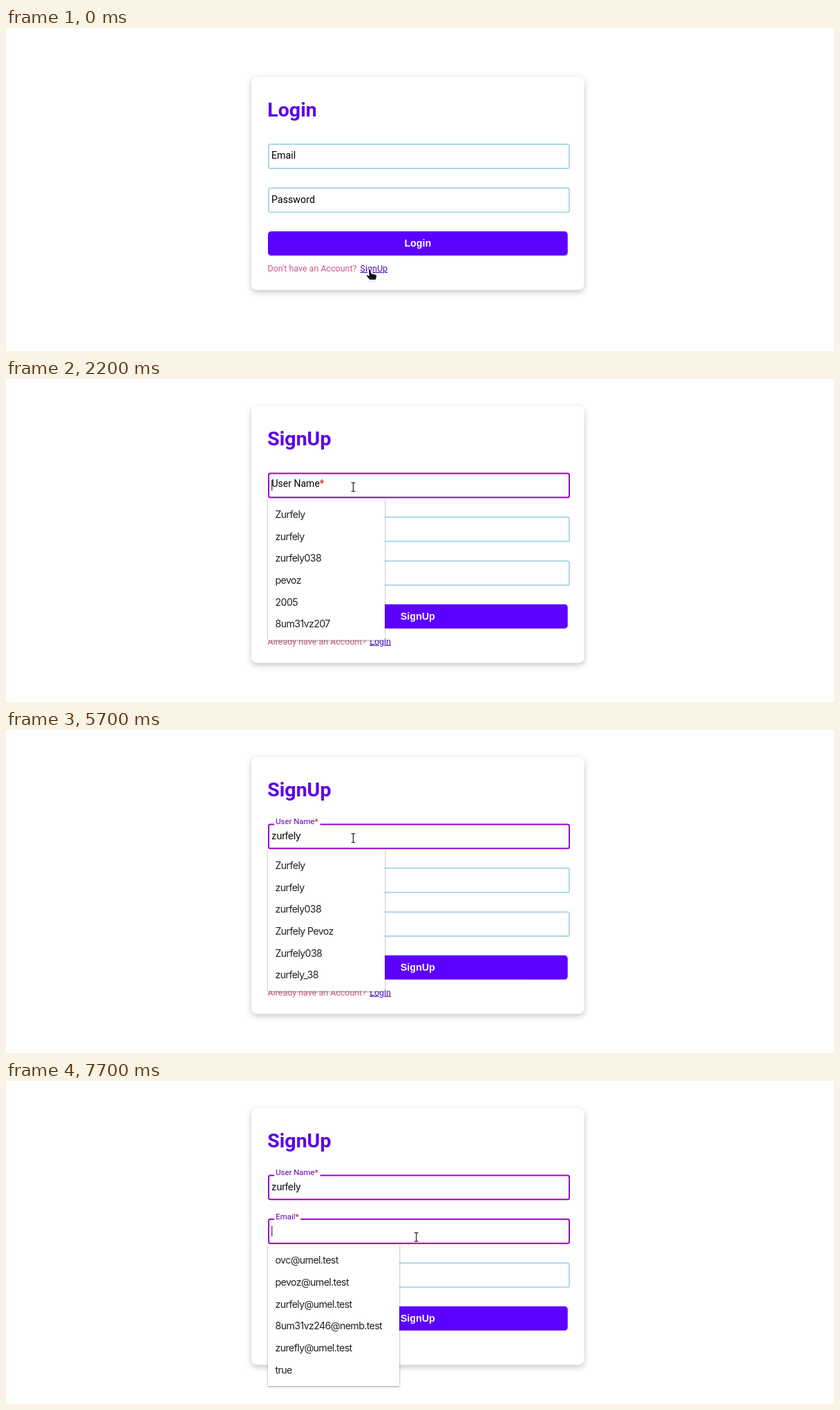
These frames come from a looping animation (1198 px wide and 467 px high, 8000 ms). An HTML page:

```html
<!DOCTYPE html>
<html lang="en">
<head>
<meta charset="utf-8">
<title>Sign-up form</title>
<style>
  html, body { margin: 0; width: 100%; height: 100%; overflow: hidden; background: #fff; }
  svg { display: block; width: 1198px; height: 467px; font: 14.26px Roboto, sans-serif; }
  .card { fill: #fff; filter: drop-shadow(0 3px 4px rgba(0, 0, 0, .23)); }
  .title { font-size: 28.5px; font-weight: 700; fill: #5c00e8; }
  .field { fill: #fff; stroke: #add8e6; stroke-width: 2; }
  .field.active { stroke: #9900cc; }
  .star { fill: #d8202c; font-weight: 700; }
  .value { font-family: "Liberation Sans", Arial, sans-serif; }
  .button { fill: #5c00ff; }
  .caption { font: 700 14.26px "Liberation Sans", Arial, sans-serif; fill: #fff; text-anchor: middle; }
  .note { font-size: 12.48px; fill: #cb5688; }
  .link { font-size: 12.48px; fill: #5010b8; text-decoration: underline; }
  .link.pressed { fill: #e00; }
  .menu { fill: #fff; filter: drop-shadow(0 1px 1.5px rgba(0, 0, 0, .4)); }
  .option { font-family: Inter, sans-serif; letter-spacing: -.65px; fill: #222; }
</style>
</head>
<body>
<svg id="stage" viewBox="0 0 1198 467"></svg>
<script>
const LOOP = 8000, STEP = 100, PITCH = 63.4, ROW = 31.7;
const PRESS = 1100, SWITCH = 1200;
const NAME = 'zurfely';
const KEY_TIMES = [3200, 3300, 3600, 4000, 4400, 4700, 4900];
const FOCUS = [2200, 6600];
const CARET_OFF = [[2700, 3200], [5700, 6200], [7100, 7700]];

const FIRST_NAMES = ['Zurfely', 'zurfely', 'zurfely038', 'pevoz', '2005', '8um31vz207'];
const MATCHED_NAMES = ['Zurfely', 'zurfely', 'zurfely038', 'Zurfely Pevoz', 'Zurfely038', 'zurfely_38'];
const EMAILS = ['ovc@umel.test', 'pevoz@umel.test', 'zurfely@umel.test',
  '8um31vz246@nemb.test', 'zurefly@umel.test', 'true'];

const LOGIN = { title: 'Login', top: 70.6, fields: ['Email', 'Password'],
  note: "Don't have an Account?", link: 'SignUp', linkX: 512.6 };
const SIGNUP = { title: 'SignUp', top: 38.9, fields: ['User Name', 'Email', 'Password'],
  note: 'Already have an Account?', link: 'Login', linkX: 526.2 };

const stage = document.getElementById('stage');
const pen = document.createElement('canvas').getContext('2d');
const measure = (text, font) => { pen.font = font; return pen.measureText(text).width; };
const clamp = v => Math.max(0, Math.min(1, v));
const mix = (a, b, p) => a + (b - a) * p;
const smooth = v => { const p = clamp(v); return p * p * (3 - 2 * p); };

const rect = (cls, x, y, w, h, r = 0) =>
  `<rect class="${cls}" x="${x}" y="${y}" width="${w}" height="${h}" rx="${r}"/>`;
const text = (cls, x, y, content, more = '') =>
  `<text class="${cls}" x="${x}" y="${y}" ${more}>${content}</text>`;

const fieldTop = (form, i) => form.top + 96.5 + PITCH * i;

function field(form, i, t) {
  const top = fieldTop(form, i), name = form.fields[i];
  const focusAt = form === SIGNUP ? FOCUS[i] : undefined;
  const active = t >= focusAt;
  let out = rect(active ? 'field active' : 'field', 380, top + 1, 435, 34.9, 2.5);
  if (!active) return out + text('', 384, top + 22.2, name);

  const p = smooth(((t - focusAt) / STEP + .6) / 3.6);
  const x = mix(384, 390.2, p), y = mix(top + 22.2, top + 1, p), size = mix(14.26, 11.41, p);
  const width = measure(name + '*', `${size}px Roboto, sans-serif`) + 5;
  const fill = `rgb(${90 * p},0,${184 * p})`;
  out += `<rect x="${x - 2}" y="${y - 10.5}" width="${width}" height="13" fill="#fff"/>`;
  return out + text('', x, y, `${name}<tspan class="star">*</tspan>`,
    `style="font-size:${size}px;fill:${fill}"`);
}

function form(f, t) {
  const n = f.fields.length, buttonTop = f.top + 96.7 + PITCH * n;
  const pressed = t >= PRESS && t < SWITCH;
  return rect('card', 355, f.top, 481.5, 181.3 + PITCH * n, 8) +
    text('title', 378.3, f.top + 57.2, f.title) +
    f.fields.map((_, i) => field(f, i, t)).join('') +
    rect('button', 379, buttonTop, 433.7, 35, 4.5) +
    text('caption', 595.8, buttonTop + 22, f.title) +
    text('note', 378.5, buttonTop + 57.7, f.note) +
    text(pressed ? 'link pressed' : 'link', f.linkX, buttonTop + 57.7, f.link);
}

function typing(t) {
  const typed = NAME.slice(0, KEY_TIMES.filter(k => t >= k).length);
  let out = text('value', 384.3, 158.4, typed);
  const inEmail = t >= FOCUS[1];
  const blinkedOff = CARET_OFF.some(([from, to]) => t >= from && t < to);
  if (t >= FOCUS[0] && !blinkedOff) {
    const x = 384.3 + (inEmail ? 0 : measure(typed, '14.26px "Liberation Sans", Arial, sans-serif'));
    out += `<rect x="${x}" y="${inEmail ? 209.6 : 146.2}" width="1" height="15"/>`;
  }
  return out;
}

function menu(t, mouse) {
  if (t < FOCUS[0]) return '';
  const inEmail = t >= FOCUS[1];
  const options = inEmail ? EMAILS : t < KEY_TIMES[1] ? FIRST_NAMES : MATCHED_NAMES;
  const top = inEmail ? 236.2 : 172.8, width = inEmail ? 190 : 169;
  const hover = mouse.x < 379 + width ? Math.floor((mouse.y - top - 7.4) / ROW) : -1;
  return rect('menu', 379, top, width, 204.7, 1) +
    options.map((option, i) => {
      const y = top + 7.4 + ROW * i;
      return (i === hover ? `<rect x="379" y="${y}" width="${width}" height="${ROW}" fill="#eee"/>` : '') +
        text('option', 389.5, y + 20.6, option);
    }).join('');
}

function mouseAt(t) {
  if (t < 5900) {
    const p = smooth((t - 1400) / 600);
    return { x: mix(526, 502.4, p), y: mix(349.6, 156.2, p) };
  }
  if (t < 6400) {
    const p = clamp((t - 5800) / 400), q = 1 - p;
    const curve = (a, b, c) => q * q * a + 2 * q * p * b + p * p * c;
    return { x: curve(502.4, 515, 584.5), y: curve(156.2, 275, 235) };
  }
  return { x: 593.6, y: t < FOCUS[1] ? 226.6 : 225.6 };
}

function pointer(t, { x, y }) {
  const onMenu = t >= FOCUS[0] && t < FOCUS[1] && x < 548 && y > 172.8;
  const onField = !onMenu && SIGNUP.fields.some((_, i) => {
    const top = fieldTop(SIGNUP, i);
    return y >= top && y <= top + 36.9;
  });
  let shape;
  if (t < 1500 || y > 326) {
    shape = `<path d="M-1.8 0Q0 -2.4 1.8 0L2.7 5.2L8 6.2Q11 6.8 10.7 9.5L9.3 14.8H0
      L-5 8.8Q-4.6 6.4 -1 8Z" fill="#10131c" stroke="#fff" stroke-width="1.2"/>
      <path d="M0 15H9V17H0Z" fill="#fff" stroke="#ccc" stroke-width=".5"/>`;
  } else if (onField) {
    const beam = 'M-2.8 -6.3H-1Q0 -6.3 0 -5V5Q0 6.3 -1 6.3H-2.8M2.8 -6.3H1Q0 -6.3 0 -5M0 5Q0 6.3 1 6.3H2.8';
    shape = `<path d="${beam}" fill="none" stroke="#fff" stroke-width="3"/>
      <path d="${beam}" fill="none" stroke="#222" stroke-width="1.2"/>`;
  } else {
    shape = `<path d="M0 0V15L3.5 11.8L6 17.5L8.4 16.5L6 11H10.8Z"
      fill="#10131c" stroke="#fff" stroke-width="1.1"/>`;
  }
  return `<g transform="translate(${x} ${y})">${shape}</g>`;
}

let shown = -1;
function render(now) {
  const t = Math.floor((now % LOOP) / STEP) * STEP;
  if (t !== shown) {
    shown = t;
    const mouse = mouseAt(t);
    stage.innerHTML = form(t < SWITCH ? LOGIN : SIGNUP, t) + typing(t) + menu(t, mouse) + pointer(t, mouse);
  }
}

const start = performance.now();
function tick() {
  render(performance.now() - start);
  requestAnimationFrame(tick);
}
tick();
</script>
</body>
</html>
```
